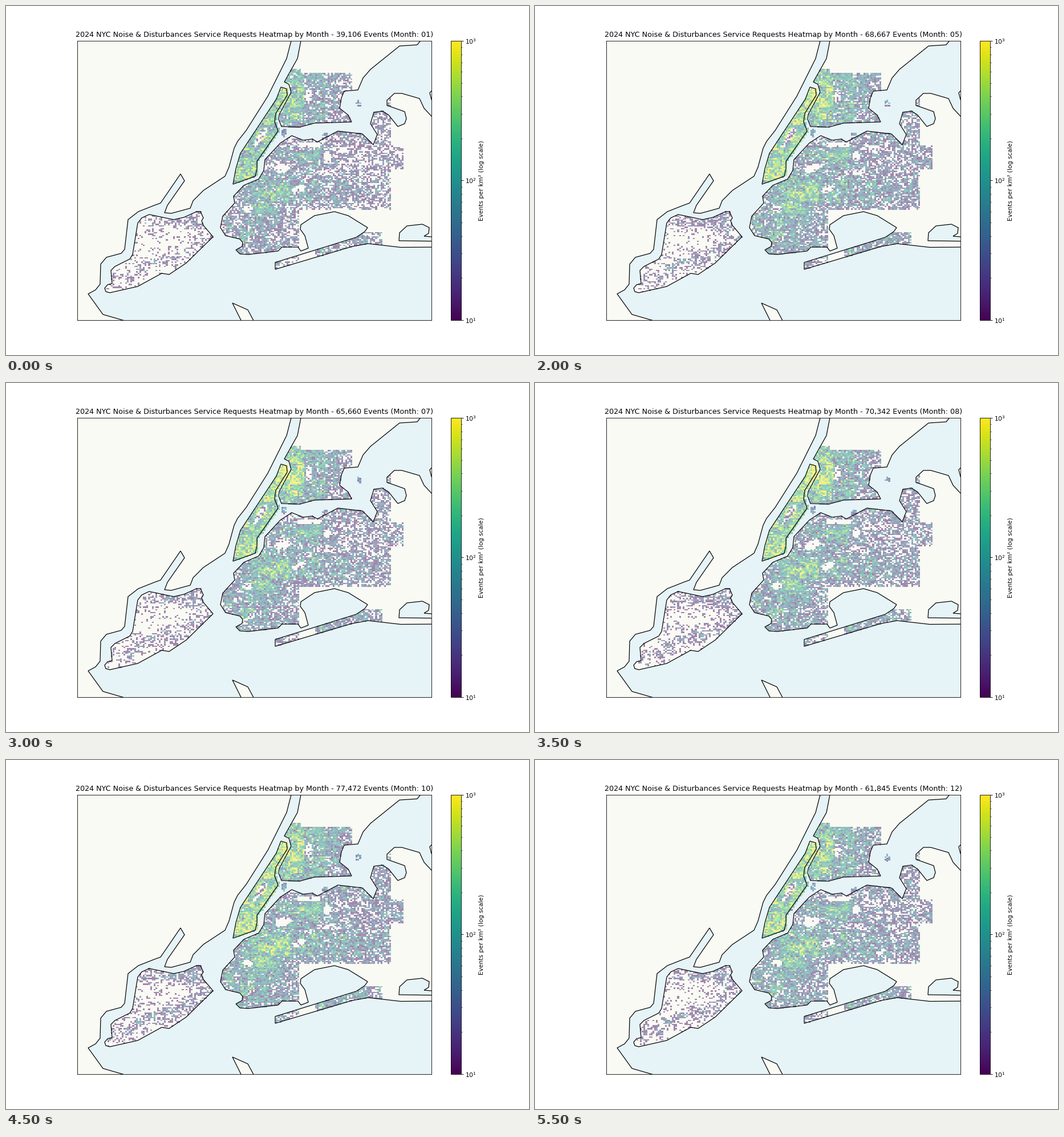
A matplotlib script that plays this animation: 917x611 px, repeating every 6000 ms.

```python
import numpy as np
import matplotlib.pyplot as plt
from matplotlib.animation import FuncAnimation
from matplotlib.cm import ScalarMappable
from matplotlib.colors import LogNorm
from matplotlib.patches import Polygon
from matplotlib.path import Path

W, H, DPI = 917, 611, 76.375
LEFT, RIGHT, TOP, BOTTOM = 124.8, 746.2, 61.1, 549.8
LAND, WATER = (0.982, 0.982, 0.957), (0.902, 0.954, 0.97)

# Corner points of the coast, in stage pixels; they run past the frame where it cuts them.
WEST_SHORE = [
    (500, 50), (500, 61), (492, 92), (459, 158), (421, 218), (406, 237), (400, 249),
    (391, 282), (384, 298), (346, 323), (328, 341), (323, 354), (290, 363), (278, 362),
    (283, 349), (313, 306), (306, 294), (271, 345), (260, 349), (232, 360), (214, 374),
    (208, 426), (202, 433), (176, 440), (166, 452), (165, 487), (157, 497), (144, 504),
    (170, 540), (215, 553), (215, 570), (100, 570), (100, 50)]
STATEN = [
    (251, 365), (294, 374), (312, 370), (334, 360), (341, 360), (346, 371), (343, 376),
    (346, 384), (363, 404), (316, 450), (286, 470), (273, 468), (231, 491), (182, 502),
    (175, 500), (173, 494), (178, 488), (186, 486), (184, 463), (191, 456), (217, 443),
    (222, 435), (231, 380), (238, 371)]
MAINLAND = [
    (517, 50), (517, 61), (511, 92), (488, 133), (496, 137), (500, 151), (479, 190),
    (478, 198), (483, 211), (515, 212), (541, 205), (606, 203), (600, 191), (585, 179),
    (588, 161), (593, 149), (617, 147), (626, 126), (639, 111), (690, 70), (721, 68), (735, 50)]
MANHATTAN = [
    (482, 142), (492, 145), (493, 156), (473, 188), (471, 203), (477, 219), (440, 272),
    (440, 285), (437, 298), (398, 312), (403, 285), (411, 258), (474, 163)]
SOUTH_SHORE = [
    (770, 422), (692, 422.5), (635, 416), (607, 421), (472, 461), (472, 449), (614, 405),
    (629, 395), (634, 388), (600, 367), (576, 360), (541, 367), (517, 383), (516, 391),
    (524, 402), (530, 424), (517, 429), (512, 422), (484, 422), (477, 429), (425, 435),
    (410, 434), (403, 427), (414, 421), (415, 414), (410, 408), (385, 402), (376, 388),
    (380, 368), (401, 345), (399, 333), (417, 314), (443, 303), (452, 288), (454, 269)]
NORTH_SHORE = [
    (481, 240), (501, 227), (521, 235), (537, 233), (546, 238), (582, 219), (625, 224),
    (644, 243), (651, 225), (639, 206), (645, 186), (660, 184), (671, 191), (687, 211),
    (699, 206), (702, 197), (699, 185), (668, 174), (668, 165), (681, 153), (694, 153),
    (725, 162), (733, 179), (746, 193), (770, 210)]
EAST_BAY = [
    (770, 412), (689, 411), (690, 397), (703, 385), (730, 382), (742, 388), (741, 398),
    (733, 403), (770, 406)]
HOOK = [(397, 520), (424, 532), (438, 558), (416, 558)]
EAST_TIP = [(752, 142), (743, 152), (746, 164), (752, 168)]
ISLAND = SOUTH_SHORE + NORTH_SHORE

EVENTS = [39106, 42518, 51383, 54207, 68667, 76914, 65660, 70342, 88355, 77472, 62390, 61845]

BINS = 200
CELL_KM2 = 0.078
steps = (np.arange(BINS) + 0.5) / BINS
X, Y = np.meshgrid(LEFT + steps * (RIGHT - LEFT), TOP + steps * (BOTTOM - TOP))


def inside(outline):
    centers = np.column_stack([X.ravel(), Y.ravel()])
    return Path(outline).contains_points(centers).reshape(X.shape)


def blob(x, y, rx, ry, tilt=0):
    c, s = np.cos(np.radians(tilt)), np.sin(np.radians(tilt))
    u, v = (X - x) * c + (Y - y) * s, (Y - y) * c - (X - x) * s
    return np.exp(-(u / rx) ** 2 - (v / ry) ** 2)


def base_rate():
    """Relative number of events per cell: borough levels, busy centres, empty parks."""
    island, mainland, manhattan = inside(ISLAND), inside(MAINLAND), inside(MANHATTAN)
    manhattan |= np.roll(manhattan, 1, axis=1)
    bronx = mainland & (X < 606) & (Y > 117 - 8 * (X < 515))
    city_line = np.where(abs(Y - 265) < 20, 698, 674)
    city = island & (X < city_line) & ((Y < 357) | (X < 512))
    rockaway = island & (Y > 395) & (X > 540) & (X < 659)

    rate = inside(STATEN) * (0.08 + 0.55 * blob(300, 375, 50, 14) + 0.4 * blob(338, 385, 16, 30)
                             + 0.35 * blob(260, 452, 110, 12, -22))
    rate += rockaway * 1.4
    rate += city * (0.8 + 8 * blob(480, 318, 42, 16) + 6 * blob(455, 345, 24, 25)
                    + 3.5 * blob(585, 325, 48, 14) + 5 * blob(522, 259, 40, 13)
                    + 2 * blob(425, 392, 50, 35))
    rate += bronx * (1 + 14 * blob(503, 165, 22, 36) + 4 * blob(550, 145, 18, 40))
    rate = np.where(manhattan, 11 + 16 * blob(484, 162, 16, 30) + 11 * blob(423, 286, 16, 14), rate)
    for x, y in [(617, 171), (558, 228), (487, 222)]:
        rate += 1.2 * (blob(x, y, 6, 7) > 0.4)

    parks = [(446, 229, 21, 5, -56), (530, 158, 6, 13), (486, 284, 15, 7, -20),
             (513, 320, 12, 6, -20), (562, 263, 6, 9), (424, 355, 9, 6), (530, 243, 25, 4)]
    for park in parks:
        rate[blob(*park) > 0.37] *= 0.02

    rng = np.random.default_rng(11)
    blocks = np.kron(rng.lognormal(-0.12, 0.5, (BINS // 4, BINS // 4)), np.ones((4, 4)))
    return rate * blocks * rng.lognormal(-0.35, 0.85, rate.shape)


RATE = base_rate()


def density(month):
    summer = np.exp(-((month - 6) / 1.8) ** 2)
    rate = RATE * (1 + summer * (1.2 * blob(496, 160, 26, 36) - 0.15))
    rate *= EVENTS[month] / rate.sum()
    counts = np.random.default_rng(100 + month).poisson(rate)
    return np.ma.masked_equal(counts, 0) / CELL_KM2


def place(left, top, right, bottom):
    return [left / W, 1 - bottom / H, (right - left) / W, (bottom - top) / H]


plt.rcParams["font.family"] = "DejaVu Sans"
fig = plt.figure(figsize=(W / DPI + 1e-9, H / DPI + 1e-9), dpi=DPI, facecolor="white")
ax = fig.add_axes(place(LEFT, TOP, RIGHT, BOTTOM), facecolor=WATER)
ax.set_xticks([])
ax.set_yticks([])


def coast(outline, fill):
    ax.add_patch(Polygon(outline, facecolor=fill, edgecolor="none", zorder=1))
    ax.add_patch(Polygon(outline, fill=False, edgecolor="black", linewidth=1.15, zorder=3))


for shore in (WEST_SHORE, STATEN, MAINLAND, MANHATTAN, ISLAND, HOOK, EAST_TIP):
    coast(shore, LAND)
coast(EAST_BAY, WATER)

norm = LogNorm(10, 1000)
months = [density(m) for m in range(len(EVENTS))]
heatmap = ax.imshow(months[0], norm=norm, cmap="viridis", alpha=0.5, zorder=2, aspect="auto",
                    interpolation="nearest", extent=(LEFT, RIGHT, BOTTOM, TOP))
title = ax.set_title("", pad=6.6)

cax = fig.add_axes(place(779.6, TOP, 798, BOTTOM))
fig.colorbar(ScalarMappable(norm, "viridis"), cax=cax, label="Events per km² (log scale)")


def update(month):
    heatmap.set_data(months[month])
    title.set_text("2024 NYC Noise & Disturbances Service Requests Heatmap by Month - "
                   f"{EVENTS[month]:,} Events (Month: {month + 1:02d})")
    return heatmap, title


anim = FuncAnimation(fig, update, frames=len(EVENTS), interval=500, repeat=True, repeat_delay=0)
plt.show()
```
